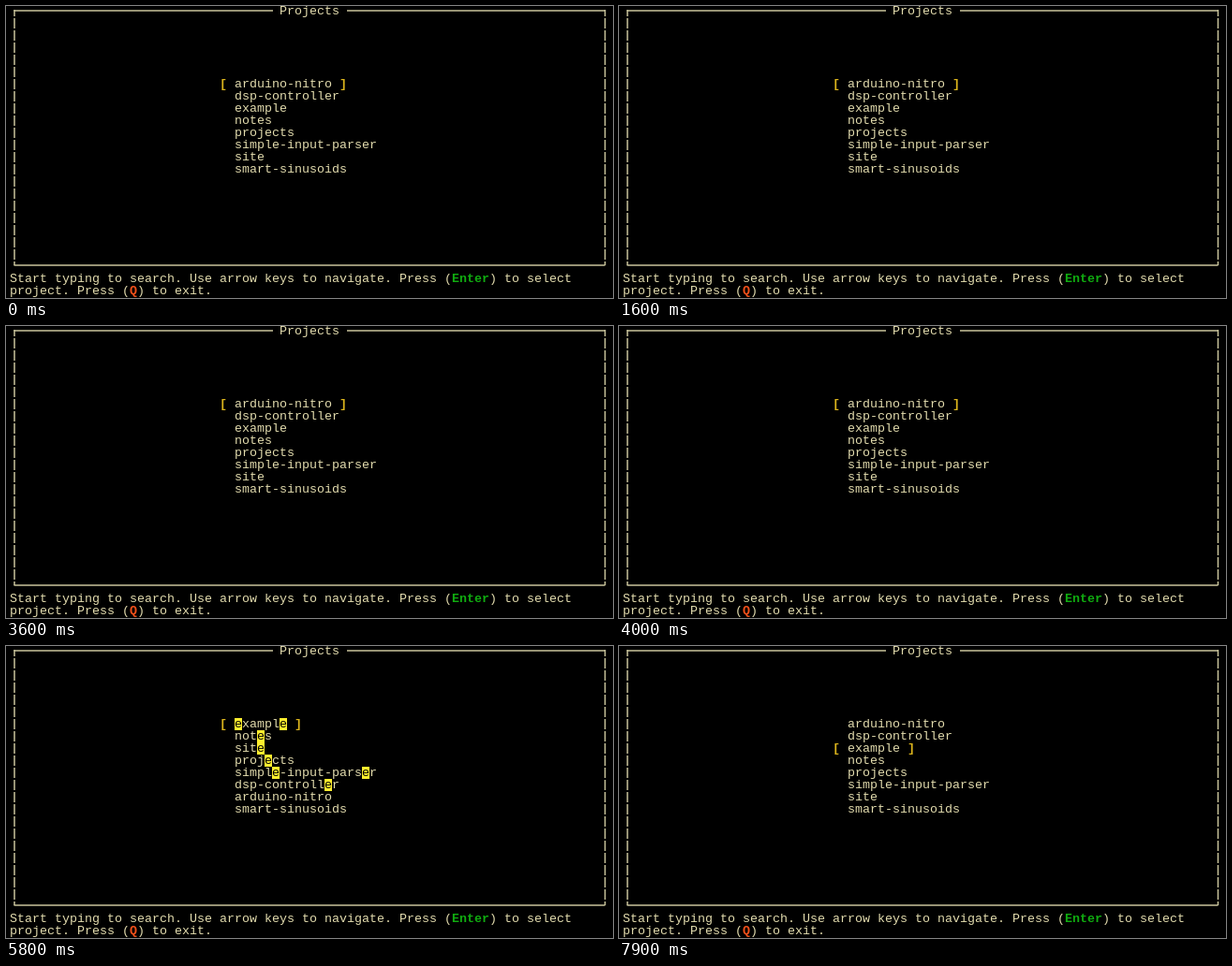
Write an HTML page that moves like this. It is 648 px wide and 312 px high and loops after 8 s.

```html
<!DOCTYPE html>
<html lang="en">
<head>
<meta charset="utf-8">
<title>Project picker</title>
<style>
  html, body { margin: 0; width: 100%; height: 100%; overflow: hidden; background: #000; }
  svg { display: block; }
  text { font: 13.333px "Liberation Mono", "Courier New", monospace; white-space: pre; }
  .bold { font-weight: bold; }
</style>
</head>
<body>
<svg width="648" height="312" viewBox="0 0 648 312">
  <g fill="none" stroke="#c9c49c" stroke-width="1.5">
    <path d="M8.5 5H285M364 5H639.5M8.5 277H639.5"/>
    <path d="M9 4V277M639.5 4V277" stroke-dasharray="11 2" stroke-dashoffset="4"/>
  </g>
  <g id="labels"></g>
  <g id="list"></g>
</svg>
<script>
const LOOP = 8000, CELL_W = 8, CELL_H = 13;
const LIST_COL = 30, LIST_ROW = 6;
const TEXT = '#e3dcae', BRACKET = '#dcb51c', MARK = '#ffee2e';
const projects = ['arduino-nitro', 'dsp-controller', 'example', 'notes',
  'projects', 'simple-input-parser', 'site', 'smart-sinusoids'];

// Search state from each start time on
const states = [
  { from: 0, query: '', selected: 'arduino-nitro' },
  { from: 2300, query: 'a', selected: 'arduino-nitro' },
  { from: 3300, query: '', selected: 'arduino-nitro' },
  { from: 4400, query: 'e', selected: 'example' },
  { from: 5900, query: '', selected: 'example' }
];

const labels = document.getElementById('labels');
const list = document.getElementById('list');

function add(parent, tag, attrs, content = '') {
  const el = document.createElementNS('http://www.w3.org/2000/svg', tag);
  for (const key in attrs) el.setAttribute(key, attrs[key]);
  el.textContent = content;
  parent.append(el);
}

function write(parent, col, row, content, fill = TEXT, weight = '') {
  add(parent, 'text', { x: 4 + col * CELL_W, y: 9 + row * CELL_H, fill, class: weight }, content);
}

// Writes [text, colour] parts one after another; coloured parts are bold
function writeParts(row, parts) {
  let col = 0;
  for (const [content, color] of parts) {
    write(labels, col, row, content, color, color && 'bold');
    col += content.length;
  }
}

function rank(name, query) {
  const index = name.indexOf(query);
  return index < 0 ? Infinity : index;
}

function compare(a, b, query) {
  const x = rank(a, query), y = rank(b, query);
  return x === y ? 0 : x - y;
}

function drawList({ query, selected }) {
  list.replaceChildren();
  const sorted = [...projects].sort((a, b) => compare(a, b, query));
  sorted.forEach((name, i) => {
    const row = LIST_ROW + i;
    write(list, LIST_COL, row, name);
    [...name].forEach((char, j) => {
      if (char !== query) return;
      const col = LIST_COL + j;
      add(list, 'rect', { x: 4 + col * CELL_W, y: row * CELL_H - 1,
        width: CELL_W, height: CELL_H, fill: MARK });
      write(list, col, row, char, '#000');
    });
    if (name === selected) {
      write(list, LIST_COL - 2, row, '[', BRACKET, 'bold');
      write(list, LIST_COL + name.length + 1, row, ']', BRACKET, 'bold');
    }
  });
}

write(labels, 36, 0, 'Projects');
writeParts(22, [['Start typing to search. Use arrow keys to navigate. Press ('],
  ['Enter', '#10ad10'], [') to select']]);
writeParts(23, [['project. Press ('], ['Q', '#f5501a'], [') to exit.']]);

let shown;
function frame() {
  const time = performance.now() % LOOP;
  const state = states.findLast(s => s.from <= time);
  if (state !== shown) drawList(shown = state);
  requestAnimationFrame(frame);
}
frame();
</script>
</body>
</html>
```
